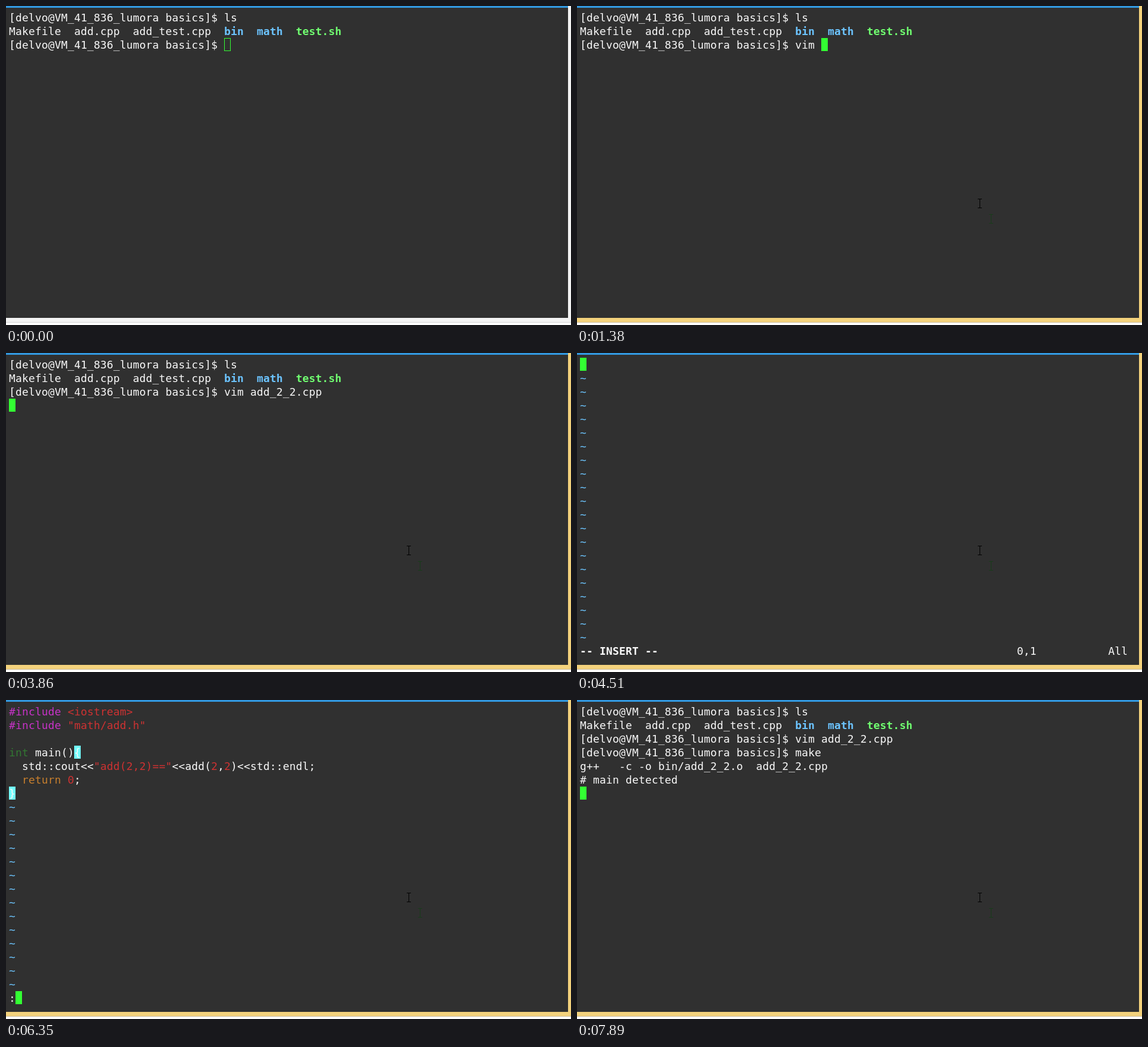
An HTML page with a canvas for the animation above (7.99 s loop, 953 by 538 pixels).

```html
<!DOCTYPE html>
<html lang="en">
<head>
<meta charset="utf-8">
<title>Terminal session</title>
<style>
html, body { margin: 0; width: 100%; height: 100%; overflow: hidden; background: #fff; }
canvas { display: block; }
</style>
</head>
<body>
<canvas id="stage" width="953" height="538"></canvas>
<script>
const ctx = document.getElementById('stage').getContext('2d');
const LOOP = 7990, CELL = 11, LINE = 23, LEFT = 5, TOP = 8;
const BG = '#303030', WHITE = '#f8f8f8', GREEN = '#33ff33', BLUE = '#6cc4ff', LIME = '#70ff70',
      MAGENTA = '#c832c8', RED = '#cd3232', TYPE = '#327832', ORANGE = '#c87f2d', CYAN = '#72ffff';
const PROMPT = '[delvo@VM_41_836_lumora basics]$ ';

// Command lines: [time, text typed so far]
const OPEN = [[0, ''], [1090, 'v'], [1180, 'vi'], [1280, 'vim'], [1380, 'vim '], [1590, 'vim a'],
  [1800, 'vim add'], [2080, 'vim add_'], [2390, 'vim add_2'], [2690, 'vim add_2_'],
  [2930, 'vim add_2_2'], [3270, 'vim add_2_2.'], [3460, 'vim add_2_2.c'], [3660, 'vim add_2_2.cpp']];
const BUILD = [[7010, ''], [7290, 'm'], [7440, 'ma'], [7590, 'mak'], [7740, 'make']];
const QUIT = [[6350, ':'], [6550, ':w'], [6700, ':wq']];

// Source lines as [text, colour] runs
const CODE = [
  [['#include ', MAGENTA], ['<iostream>', RED]],
  [['#include ', MAGENTA], ['"math/add.h"', RED]],
  [],
  [['int', TYPE], [' main(){', WHITE]],
  [['  std::cout<<', WHITE], ['"add(2,2)=="', RED], ['<<add(', WHITE], ['2', RED], [',', WHITE],
    ['2', RED], [')<<std::endl;', WHITE]],
  [['  return ', ORANGE], ['0', RED], [';', WHITE]],
  [['}', WHITE]]
];

const typed = (steps, t) => steps.filter(s => s[0] <= t).pop()[1];

function rect(x, y, w, h, color) {
  ctx.fillStyle = color;
  ctx.fillRect(x, y, w, h);
}

function block(row, col, color = GREEN) {
  rect(LEFT + col * CELL, TOP + row * LINE, CELL, 22, color);
}

function put(row, col, text, color = WHITE, bold = false) {
  ctx.font = `${bold ? 'bold ' : ''}18px "DejaVu Sans Mono", monospace`;
  ctx.fillStyle = color;
  [...text].forEach((ch, i) => ctx.fillText(ch, LEFT + (col + i) * CELL, TOP + 18 + row * LINE));
}

function shell(t) {
  put(0, 0, PROMPT + 'ls');
  put(1, 0, 'Makefile  add.cpp  add_test.cpp');
  put(1, 33, 'bin', BLUE, true);
  put(1, 38, 'math', BLUE, true);
  put(1, 44, 'test.sh', LIME, true);
  const open = PROMPT + typed(OPEN, t);
  put(2, 0, open);
  if (t < 70) {
    ctx.strokeStyle = GREEN;
    ctx.strokeRect(LEFT + open.length * CELL + .5, TOP + 2 * LINE + .5, CELL - 1, 21);
  } else if (t < 3860) {
    block(2, open.length);
  } else if (t < 7010) {
    block(3, 0);
  } else {
    const build = PROMPT + typed(BUILD, t);
    put(3, 0, build);
    if (t < 7890) return block(3, build.length);
    put(4, 0, 'g++   -c -o bin/add_2_2.o  add_2_2.cpp');
    put(5, 0, '# main detected');
    block(6, 0);
  }
}

function editor(t) {
  const pasted = t >= 5180;
  for (let row = pasted ? CODE.length : 1; row < 21; row++) put(row, 0, '~', BLUE);

  if (pasted) {
    block(3, 10, CYAN);
    block(6, 0, t >= 6000 && t < 6350 ? GREEN : CYAN);
    CODE.forEach((runs, row) => {
      let col = 0;
      for (const [text, color] of runs) {
        put(row, col, text, color);
        col += text.length;
      }
    });
  }

  if (t < 6000) {
    if (t < 4510) put(21, 0, '"add_2_2.cpp" [New File]');
    else put(21, 0, '-- INSERT --', WHITE, true);
    put(21, 67, t < 4510 ? '0,0-1' : pasted ? '7,2' : '0,1');
    put(21, 81, 'All');
    pasted ? block(6, 1) : block(0, 0);
  } else if (t >= 6350) {
    const command = typed(QUIT, t);
    put(21, 0, command);
    block(21, command.length);
  }
}

function beam(x, y, color) {
  rect(x, y, 1, 16, color);
  for (const end of [y, y + 15]) {
    rect(x - 3, end, 3, 1, color);
    rect(x + 1, end, 3, 1, color);
  }
}

function draw(t) {
  const edge = t < 70 ? '#f3f3f3' : '#f3d27c';
  rect(0, 0, 953, 538, '#fff');
  rect(0, 0, 953, 533, edge);
  rect(0, 533, 953, 1, t < 70 ? '#d2d2d2' : '#c9b894');
  rect(0, 0, 948, 526, BG);
  rect(0, 0, 948, 3, '#3399e0');

  t >= 4170 && t < 6860 ? editor(t) : shell(t);

  if (t >= 245) {
    beam(698, 351, '#183c1a');
    beam(679, 325, '#000');
  } else if (t >= 70) {
    beam(698, 351, '#000');
  }
}

function tick() {
  draw(performance.now() % LOOP);
  requestAnimationFrame(tick);
}
tick();
</script>
</body>
</html>
```
